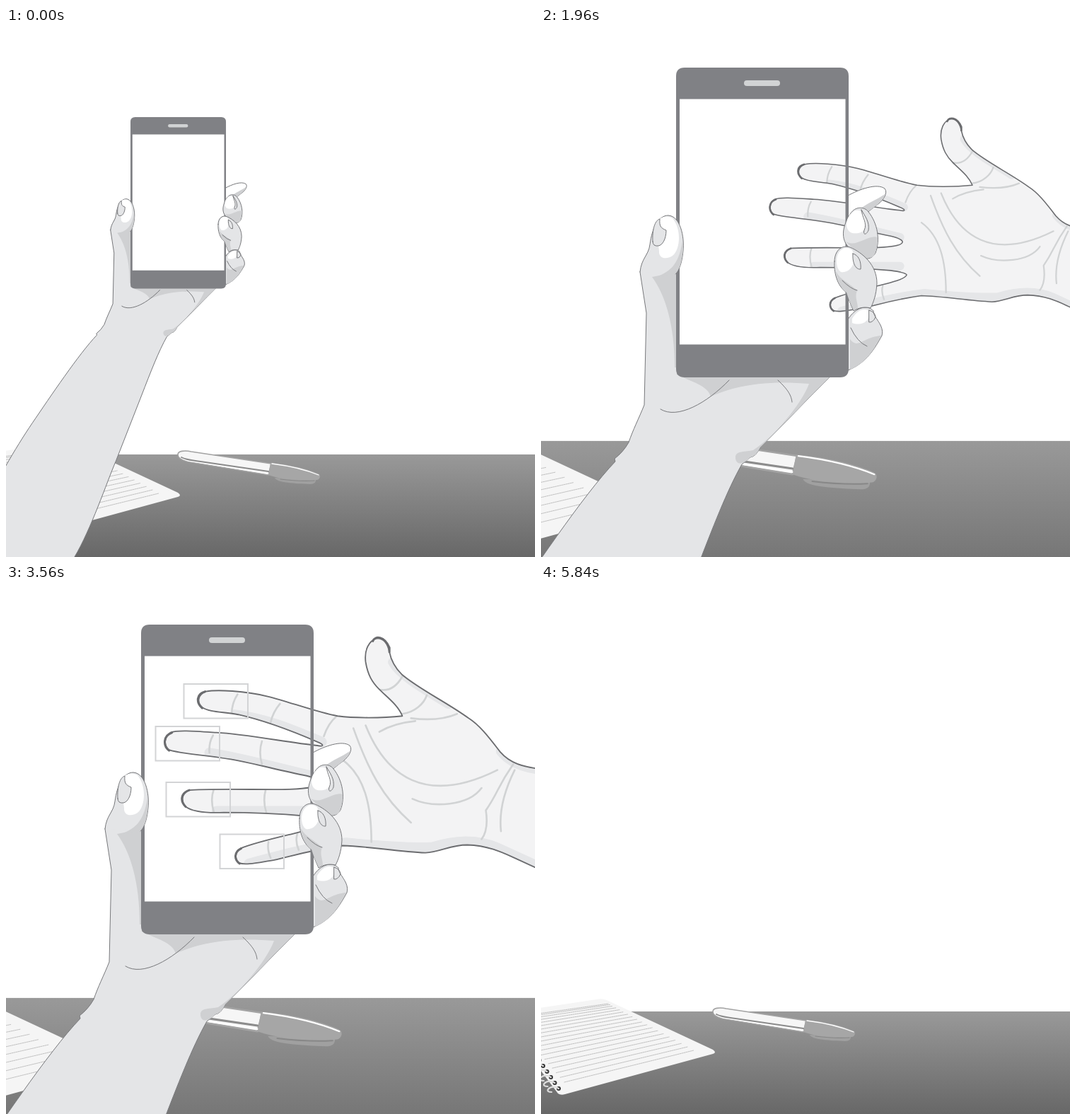
Recreate the animation shown at these times as an HTML page. Size 748 px wide and 748 px high, loop 5.88 s.

```html
<!DOCTYPE html>
<html lang="en">
<head>
<meta charset="utf-8">
<title>Hand scan</title>
<style>
html, body { margin: 0; height: 100%; overflow: hidden; background: #fff; }
svg { display: block; width: 100vw; height: 100vh; fill: none; }
path { stroke-linecap: round; stroke-linejoin: round; }
.skin { fill: #e4e5e7; stroke: #77787b; }
.tone { fill: #cfd0d2; }
.white { fill: #fff; }
.line { stroke: #77787b; }
#grip path, #rules path { vector-effect: non-scaling-stroke; }
</style>
</head>
<body>
<svg viewBox="0 0 748 748">
  <defs>
    <linearGradient id="wood" x1="0" y1="0" x2="0" y2="1">
      <stop offset="0" stop-color="#999"/><stop offset="1" stop-color="#676767"/>
    </linearGradient>
    <path id="palm" d="M840 274L748 260.500C725 257 708 253 694 237C680 219 666 200 650 190C620 168 580 149 557 129C547 119 542 108 540 98C537 84 530 79 523 79C511 82 505 96 507 112C510 130 516 140 526 150C538 162 552 172 558 187C530 190 490 190 468 187C440 182 400 167 372 160C340 152 300 150 285 153C274 157 272 168 280 175C290 182 310 181 330 185C370 194 410 210 440 223C450 227 449 230 440 228C400 224 340 212 300 210C270 208 245 206 236 210C227 215 226 228 234 234C250 240 290 241 330 249C360 255 390 263 425 270C438 273 445 277 444 280C442 288 400 289 380 289C340 289 280 288 262 290C252 294 250 304 256 312C265 320 285 322 310 321C350 321 390 323 425 326C440 328 450 330 451 333C448 341 420 347 400 352C375 358 345 366 333 371C325 376 325 386 331 391C340 395 360 390 380 387C400 383 430 373 475 367C510 368 550 375 590 377C610 376 625 366 648 366C680 367 700 378 718 386L748 400L840 440"/>
    <clipPath id="inside"><use href="#palm"/></clipPath>
    <g id="desk">
      <rect x="-400" y="603" width="1500" height="146" fill="url(#wood)"/>
      <path fill="#f5f5f5" d="M-60 607L78 586Q86 584 93 587L243 657Q249 661 243 663L34 720Q28 722 24 719Z"/>
      <g id="rules"></g>
      <g id="rings"></g>
      <path fill="#f6f6f6" stroke="#a3a3a3" stroke-width="1.6" d="M243 603C243 598 252 597 262 599L375 616L371 632L262 614C250 612 243 609 243 603Z"/>
      <path stroke="#fff" stroke-width="1.5" d="M245 604C247 610 256 612 264 613L371 630"/>
      <path stroke="#8c8c8c" stroke-width="2" d="M248 607C255 611 263 611 275 613L371 627"/>
      <path fill="#a0a0a0" d="M380 636L438 638Q439 645 430 645C410 644 382 643 380 636Z"/>
      <path fill="#a6a6a6" d="M374 615C400 617 425 623 441 630C446 632 444 638 440 639C420 641 390 639 371 632Z"/>
      <path stroke="#fff" stroke-width="1.3" d="M376 616C400 619 425 625 442 632"/>
      <path stroke="#888" stroke-width="1.2" d="M388 638C405 640 420 641 436 640"/>
    </g>
  </defs>

  <use id="room" href="#desk"/>

  <g id="guest">
    <use href="#palm" fill="#f3f3f4"/>
    <g clip-path="url(#inside)">
      <path stroke="#e5e6e8" stroke-width="14" d="M325 185C370 190 410 208 446 223M290 238C330 244 390 260 440 272M300 319H440M345 392C390 380 430 369 480 363C530 368 570 371 600 369C630 360 660 357 690 370L760 402M545 112C556 132 590 150 622 170M840 270L748 261C722 258 706 250 695 236"/>
      <path stroke="#d1d3d4" stroke-width="2.6" d="M329 157q-8 12-8 27M388 170q-10 12-13 26M467 187q-12 10-18 28M295 214q-6 10-5 24M363 222q-5 15 0 32M296 289q-5 14 0 31M368 290q-4 15 1 31M372 362q-2 10 3 22M412 351q-3 10 2 22M490 204C510 260 530 300 570 335M507 200C535 270 590 312 690 262M572 302C600 315 650 312 668 287M475 248C505 270 515 310 515 362M712 254C690 285 692 292 674 318Q678 345 668 358M714 262C700 290 692 320 695 347M525 150q20 5 33-18M558 184C575 182 588 170 592 158M570 190C600 194 620 190 634 184M526 209q20-12 50-15"/>
    </g>
    <use href="#palm" stroke="#6b6c6f" stroke-width="1.8"/>
    <path stroke="#6b6c6f" stroke-width="3" d="M517 83C520 75 533 76 540 92V98M284 153C272 156 271 168 280 176M238 210C226 214 225 228 234 235M262 290C250 294 249 305 257 313M334 371C324 376 324 386 332 392"/>
  </g>

  <g id="frames" stroke="#d3d4d6" stroke-width="2"></g>

  <g id="grip">
    <path class="skin" d="M140 345L149 403L146 533C138 553 130 568 124 586Q116 600 104 609L105 613C60 660 -15 772 -60 838S-150 985 -200 1080V1300H0L48 1180C90 1110 130 990 154 934L219 768C243 706 263 654 284 617L296 607Q304 606 310 593C342 562 375 526 412 490H193V320H150Z"/>
    <path class="tone" d="M157 352L193 345V480H189C189 420 176 378 157 352ZM192 490C212 500 235 505 240 521C290 499 340 500 379 503C371 526 335 574 300 597C284 600 274 598 275 609C277 619 287 617 296 607Q304 606 310 593C342 562 375 526 410 492Z"/>
    <path class="line" d="M169 539C193 554 235 530 266 498M335 498C350 512 354 520 355 529"/>
    <path class="white line" d="M434 237C450 228 475 219 486 227C491 233 484 243 478 248C468 255 460 262 452 270H434Z"/>
    <path class="tone" d="M450 257C462 247 473 244 486 235C485 243 476 250 466 257L453 268Z"/>
    <path class="skin" d="M434 412C445 394 462 391 470 400C470 410 486 420 482 435C472 453 460 474 434 484Z"/>
    <path class="tone" d="M437 440C448 455 455 437 481 435C472 453 460 474 437 483Z"/>
    <path class="white" d="M440 411C448 397 458 396 464 400C466 418 450 421 440 417Z"/>
    <path class="line" d="M438 424Q447 444 461 450M464 399Q473 402 473 409Q469 417 464 416Z"/>

    <path d="M203 56H423Q435 56 435 68V482Q435 494 423 494H203Q191 494 191 482V68Q191 56 203 56ZM196 100.500V447.500H430.500V100.500Z" fill-rule="evenodd" fill="#808185"/>
    <rect x="287" y="74" width="51" height="8" rx="4" fill="#d1d3d4"/>

    <path class="skin" d="M140 345C142 325 152 322 154 306C157 283 166 265 180 265C197 266 203 295 201 315C199 335 195 342 190 348"/>
    <path class="tone" d="M201 312C199 335 195 342 189 349L158 354C183 345 194 336 200 302Z"/>
    <path class="white" d="M162 278C168 266 178 264 186 269C198 283 198 312 186 322C177 328 166 326 167 315Z"/>
    <path class="skin" d="M158 302C157 285 161 272 168 270C167 281 170 283 177 286C177 298 172 307 166 308Q158 309 158 302Z"/>

    <path class="skin" d="M438 262C444 252 457 252 463 260C476 276 480 300 473 318C466 330 454 328 445 316C424 308 422 285 438 262Z"/>
    <path class="tone" d="M429 300C443 314 462 291 476 296C476 308 474 317 470 323C460 328 452 324 445 316Z"/>
    <path class="white" d="M433 271C438 257 450 254 455 262C466 284 455 292 440 290C432 287 431 279 433 271Z"/>
    <path class="line" d="M453 257C458 266 465 274 463 286C460 293 455 293 457 286C462 276 454 268 453 257Z"/>

    <path class="skin" d="M415 330C415 315 425 306 437 310C455 318 475 335 475 361C474 378 470 388 466 396C458 394 450 395 442 400L436 386L432 374C418 364 414 345 415 330Z"/>
    <path class="tone" d="M417 344C424 357 435 360 447 371C443 380 448 388 448 396L442 399L436 386L432 374C424 368 418 356 417 344Z"/>
    <path class="white" d="M418 332C417 314 430 306 440 314C448 332 437 347 424 345Q419 342 418 332Z"/>
    <path class="line" d="M426 357Q438 369 447 371"/>
    <path class="skin" d="M441 319C449 321 453 330 452 341C445 342 440 332 441 319Z"/>
  </g>

  <g id="fade" opacity="0">
    <rect width="748" height="748" fill="#fff"/>
    <use href="#desk"/>
  </g>
</svg>
<script>
const $ = id => document.getElementById(id);
const mix = (a, b, p) => a + (b - a) * p;
// quadratic ease-out between a start time and a duration
const ease = (t, start, span) => {
  const p = Math.min(1, Math.max(0, (t - start) / span));
  return 1 - (1 - p) ** 2;
};
const place = (id, x, y, s) => $(id).setAttribute('transform', `translate(${x} ${y}) scale(${s})`);

const LOOP = 5880, TICK = 40;

let rules = '';
for (let i = 0; i < 19; i++) {
  const u = (i / 18) ** 1.35;
  rules += `<path stroke="#aaa" stroke-width=".7" stroke-dasharray="2 1" d="M${mix(-45, 33, u)} ${mix(612, 703, u)}L${mix(95, 216, u)} ${mix(592, 658, u)}"/>`;
}
$('rules').innerHTML = rules;

let rings = '';
for (let i = 0; i < 7; i++) {
  const x = 25 - i * 5.5, y = 712 - i * 8;
  rings += `<circle cx="${x}" cy="${y}" r="3" fill="#333"/>` +
    `<path stroke="#ddd" stroke-width="2.200" d="M${x} ${y}q-9-5-15 1q-2 4 5 4"/>`;
}
$('rings').innerHTML = rings;

$('frames').innerHTML = [[251.5, 140], [211.5, 200], [226.5, 279], [302.5, 352.5]]
  .map(([x, y]) => `<rect x="${x}" y="${y}" width="90.500" height="48.500"/>`).join('');

function draw(now) {
  const t = Math.floor(now % LOOP / TICK) * TICK;

  const zoom = ease(t, 440, 680);
  place('room', -249 * zoom, -399 * zoom, 1 + 0.63 * zoom);
  place('grip', mix(70.3, 0, zoom), mix(95, 0, zoom), mix(0.5534, 1, zoom));

  const away = 1 - ease(t, 1600, 560);
  const near = ease(t, 2360, 920);
  place('guest', mix(52.3, -7.6, near) + 575 * away, mix(33.4, -5.1, near) + 208 * away, mix(0.868, 1.018, near));
  $('guest').style.display = t < 1640 ? 'none' : '';

  $('frames').setAttribute('opacity', t < 3520 ? 0 : t < 3560 ? 0.5 : 1);
  $('fade').setAttribute('opacity', Math.max(0, (t - 5720) / 120));
  requestAnimationFrame(draw);
}
requestAnimationFrame(draw);
</script>
</body>
</html>
```
